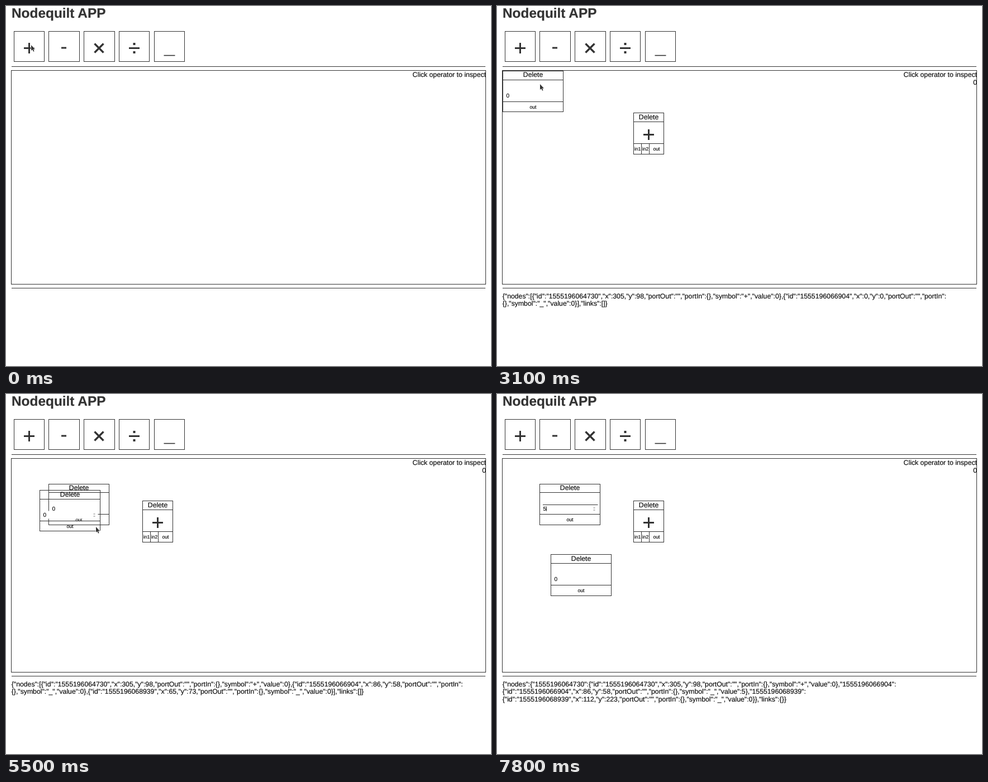
An HTML page with a canvas for the animation above (8 s loop, 868 by 645 pixels).

```html
<!DOCTYPE html>
<html lang="en">
<head>
<meta charset="utf-8">
<title>Nodequilt APP</title>
<style>
html, body { margin: 0; height: 100%; overflow: hidden; background: #fff; }
canvas { display: block; }
</style>
</head>
<body>
<canvas id="stage" width="868" height="645"></canvas>
<script>
const ctx = document.getElementById('stage').getContext('2d');
const LOOP = 8000, STEP = 100, SCALE = 0.768;
const INK = '#333', FONT = '"Liberation Sans", Arial, sans-serif';

// Pointer path: time, x, y
const POINTER = [
  [0, 45, 70], [200, 42, 64], [300, 42, 64], [1000, 39, 149], [1100, 39, 149],
  [1600, 256.3, 213.5], [1800, 273.2, 224.3], [1900, 273.2, 224.3],
  [2500, 296, 72], [2700, 296, 72], [2950, 140, 153], [3100, 77, 140], [3200, 77, 140],
  [3600, 138, 182], [3700, 143, 184.5], [3800, 143, 184.5],
  [4500, 289, 79.5], [4700, 289, 79.5], [5100, 111, 182], [5500, 161, 238],
  [5600, 199, 319], [5800, 197, 347], [6200, 197, 353.3], [6300, 197, 353.3],
  [6600, 137, 199], [6900, 88, 204], [8000, 88, 204]
];

const NODES = [
  { id: '1555196064730', symbol: '+', born: 400, drag: [1100, 1800] },
  { id: '1555196066904', symbol: '_', born: 2600, drag: [3200, 3700], hover: [6600, 8000], focus: 6900 },
  { id: '1555196068939', symbol: '_', born: 4600, drag: [5100, 6200], hover: [5200, 6200] }
];

const snap = v => Math.round(v) + 0.5;

function pointerAt(t) {
  const i = POINTER.findIndex(p => p[0] > t);
  const [t0, x0, y0] = POINTER[i - 1], [t1, x1, y1] = POINTER[i];
  const k = (t - t0) / (t1 - t0);
  return [x0 + (x1 - x0) * k, y0 + (y1 - y0) * k];
}

// A node follows the pointer for as long as it is dragged
function nodePosition({ drag: [start, end] }, t) {
  const from = pointerAt(start), to = pointerAt(Math.min(Math.max(t, start), end));
  return to.map((v, i) => Math.round((v - from[i]) / SCALE));
}

function text(str, x, y, size = 12.25, align = 'left', weight = '', color = '#000') {
  ctx.font = `${weight} ${size}px ${FONT}`;
  ctx.textAlign = align;
  ctx.fillStyle = color;
  ctx.fillText(str, x, y);
  // A hairline outline gives the slightly heavier text colour
  ctx.lineWidth = 0.2;
  ctx.strokeText(str, x, y);
}

function line(x0, y0, x1, y1, width = 1) {
  ctx.lineWidth = width;
  ctx.beginPath();
  ctx.moveTo(x0, y0);
  ctx.lineTo(x1, y1);
  ctx.stroke();
}

function box(x, y, w, h) {
  ctx.lineWidth = 1;
  ctx.strokeRect(x, y, w, h);
}

function operator(symbol, x, y) {
  ctx.fillStyle = INK;
  if ('+÷'.includes(symbol)) line(x - 9.5, y, x + 9.5, y, 3);
  if (symbol === '+') line(x, y - 9.5, x, y + 9.5, 3);
  if (symbol === '-') line(x - 4.5, y - 0.5, x + 4.5, y - 0.5, 3);
  if (symbol === '_') line(x - 10, y + 13.1, x + 10, y + 13.1, 1.6);
  if (symbol === '×') {
    line(x - 8, y - 8, x + 8, y + 8, 3.3);
    line(x - 8, y + 8, x + 8, y - 8, 3.3);
  }
  if (symbol === '÷') {
    ctx.fillRect(x - 2, y - 9.5, 4, 4);
    ctx.fillRect(x - 2, y + 5.5, 4, 4);
  }
}

function drawPage() {
  text('Nodequilt APP', 10, 21, 24.4, 'left', 'bold', INK);
  [...'+-×÷_'].forEach((symbol, i) => {
    const left = 13.7 + 62.7 * i, x = snap(left);
    box(x, 45.5, snap(left + 54.6) - x, 54);
    operator(symbol, x + 27, 75.5);
  });
  line(10, 108.5, 858, 108.5);
  line(10, 505.5, 858, 505.5);
  box(9.5, 115.5, 849, 383);
  text('Click operator to inspect', 859, 127, 12.25, 'right');
}

function drawInput(node, x, y, t) {
  ctx.fillStyle = '#fff';
  ctx.fillRect(x + 4, y + 37, 100, 14);
  text(valueAt(node, t), x + 6, y + 47.3, 10.2);
  if (node.hover && t >= node.hover[0] && t <= node.hover[1]) {
    ctx.fillStyle = '#777';
    ctx.fillRect(x + 96, y + 42, 3, 1);
    ctx.fillRect(x + 96, y + 46, 3, 1);
  }
  if (t >= node.focus) {
    line(x + 5.5, y + 37, x + 104, y + 37);
    line(x + 12, y + 40, x + 12, y + 48.5);
  }
}

function drawNode(node, t) {
  const [px, py] = nodePosition(node, t);
  const x = snap(9.9 + px * SCALE), top = 115.97 + py * SCALE, y = snap(top);
  const header = snap(top + 15.9), ports = snap(top + 54.8), bottom = snap(top + 73.3);
  const isValue = node.symbol === '_', w = isValue ? 108 : 54;
  const port = (name, dx) => text(name, x + dx, top + 67.8, 8.7, 'center');
  box(x, y, w, bottom - y);
  line(x, header, x + w, header);
  line(x, ports, x + w, ports);
  text('Delete', x + w / 2, top + 11.5, 12.25, 'center');
  if (isValue) {
    drawInput(node, x, y, t);
    port('out', 54);
  } else {
    operator(node.symbol, x + 27, snap(top + 38.3));
    line(x + 14, ports, x + 14, bottom);
    line(x + 28, ports, x + 28, bottom);
    port('in1', 7);
    port('in2', 21);
    port('out', 41);
  }
}

function valueAt(node, t) {
  if (!node.focus || t < 7400) return 0;
  return t < 7800 ? 50 : 5;
}

function drawState(nodes, t) {
  const list = nodes.map(node => {
    const [x, y] = nodePosition(node, t);
    return { id: node.id, x, y, portOut: '', portIn: {}, symbol: node.symbol, value: valueAt(node, t) };
  });
  const state = t < 7400
    ? { nodes: list, links: [] }
    : { nodes: Object.fromEntries(list.map(n => [n.id, n])), links: {} };

  // Lines may break before an opening brace
  ctx.font = `12.25px ${FONT}`;
  const lines = [''];
  for (const part of JSON.stringify(state).split(/(?={)/)) {
    const joined = lines.at(-1) + part;
    if (ctx.measureText(joined).width > 848) lines.push(part);
    else lines[lines.length - 1] = joined;
  }
  lines.forEach((str, i) => text(str, 9.7, 523.6 + 13.8 * i));
}

function drawPointer(t) {
  if (t >= 7400) return;
  const [x, y] = pointerAt(t);
  ctx.save();
  ctx.translate(Math.round(x), Math.round(y));
  if (t >= 6600 || (t >= 4500 && t <= 4700)) {
    line(0.5, -5, 0.5, 6);
    line(-2.5, -5.5, 3.5, -5.5);
    line(-2.5, 6.5, 3.5, 6.5);
  } else {
    const arrow = new Path2D('M0 0V10L2.3 8L4 11.7L5.6 11L4 7.4H7Z');
    ctx.strokeStyle = '#fff';
    ctx.lineWidth = 1.5;
    ctx.stroke(arrow);
    ctx.fillStyle = INK;
    ctx.fill(arrow);
  }
  ctx.restore();
}

function draw(now) {
  const t = Math.floor((now % LOOP) / STEP) * STEP;
  ctx.fillStyle = '#fff';
  ctx.fillRect(0, 0, 868, 645);
  ctx.strokeStyle = INK;
  ctx.textRendering = 'geometricPrecision';
  drawPage();
  const nodes = NODES.filter(node => t >= node.born);
  nodes.forEach(node => drawNode(node, t));
  if (nodes.length) drawState(nodes, t);
  if (t >= 1800) text('0', 859, 140.6, 12.25, 'right');
  drawPointer(t);
}

const start = performance.now();
function tick() {
  draw(performance.now() - start);
  requestAnimationFrame(tick);
}
tick();
</script>
</body>
</html>
```
